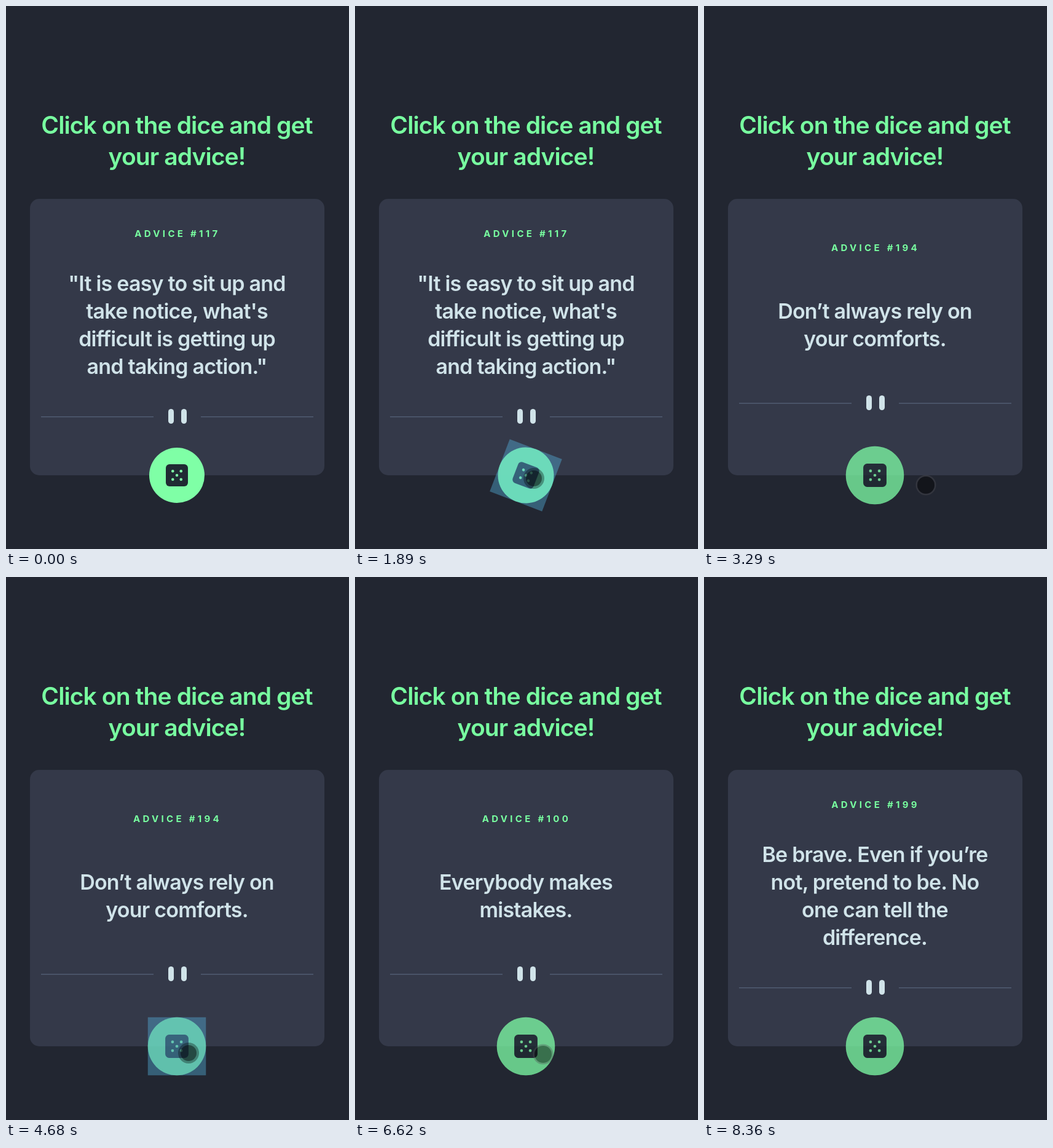
Write an HTML page with a canvas that moves like this. It is 558x884 px and loops after 9.21 s.

```html
<!DOCTYPE html>
<html lang="en">
<head>
<meta charset="utf-8">
<title>Advice dice</title>
<style>
  html, body { margin: 0; width: 100%; height: 100%; overflow: hidden; background: #222631; }
  canvas { position: absolute; left: 0; top: 0; }
  .text {
    position: absolute; left: -1px; width: 558px; margin: 0;
    text-align: center; white-space: pre;
    font-family: Inter, "Open Sans", sans-serif; font-weight: 600;
    font-optical-sizing: none; letter-spacing: -0.023em;
  }
  #title { top: 168px; font-size: 39px; line-height: 51px; color: #78ffa0; }
  #label { left: 0; font-size: 15px; line-height: 20px; font-weight: 700; letter-spacing: 4.3px; color: #78ffa0; }
  #quote { font-size: 34px; line-height: 45px; color: #d0e3e9; }
</style>
</head>
<body>
<canvas id="stage" width="558" height="884"></canvas>
<h1 id="title" class="text">Click on the dice and get
your advice!</h1>
<p id="label" class="text"></p>
<p id="quote" class="text"></p>
<script>
const W = 558, H = 884, LOOP = 9210;
const CX = 278, CY = 764, R = 45;
const BG = '#222631', CARD = '#343949', GREEN = '#7fffa6';
const PRESS = 140, HOLD = 130, TRIP = 500, EXIT_AT = 8100;

const ctx = document.getElementById('stage').getContext('2d');
const label = document.getElementById('label');
const quote = document.getElementById('quote');

const first = { id: 117, text: '"It is easy to sit up and\ntake notice, what\'s\ndifficult is getting up\nand taking action."' };

// Each round: the pointer arrives, taps, drifts away, and the reply shows up
const rounds = [
  { arrive: 950, tap: 1780, spot: [291, 769], away: [361, 780],
    reply: 3290, id: 194, text: 'Don’t always rely on\nyour comforts.' },
  { arrive: 4350, tap: 4680, spot: [297, 775], away: [357, 777],
    reply: 5150, id: 100, text: 'Everybody makes\nmistakes.' },
  { arrive: 6620, tap: 7080, spot: [306, 777], away: [395, 796],
    reply: 7700, id: 199, text: 'Be brave. Even if you’re\nnot, pretend to be. No\none can tell the\ndifference.' }
];

const trips = rounds.flatMap(r => [
  { at: r.arrive - TRIP, to: r.spot },
  { at: r.tap + HOLD, to: r.away }
]);
trips.push({ at: EXIT_AT, to: [590, 1000] });

const mix = (a, b, k) => a + (b - a) * k;
const clamp = k => Math.min(1, Math.max(0, k));
const tapped = (t, lead) => rounds.some(r => t >= r.tap - lead && t < r.tap + HOLD);

// cubic-bezier(.25, .1, .25, 1)
function ease(x) {
  const curve = (a, b, s) => 3 * a * s * (1 - s) ** 2 + 3 * b * s * s * (1 - s) + s ** 3;
  let lo = 0, hi = 1;
  for (let i = 0; i < 20; i++) {
    const mid = (lo + hi) / 2;
    if (curve(.25, .25, mid) < x) lo = mid; else hi = mid;
  }
  return curve(.1, 1, hi);
}

function disc(x, y, r, color) {
  ctx.fillStyle = color;
  ctx.beginPath();
  ctx.arc(x, y, r, 0, Math.PI * 2);
  ctx.fill();
}

function box(x, y, w, h, r, color) {
  ctx.fillStyle = color;
  ctx.beginPath();
  ctx.roundRect(x, y, w, h, r);
  ctx.fill();
}

function drawDivider(y) {
  for (const x of [57, 317]) box(x, y, 183, 1.5, 0, '#505c72');
  for (const x of [264, 285]) box(x, y - 12, 9, 24, 4.5, '#d0e3e9');
}

function drawDice() {
  box(-18, -18, 36, 36, 6, '#202a33');
  disc(0, 0, 2.25, GREEN);
  for (const x of [-6.75, 6.75])
    for (const y of [-6.75, 6.75]) disc(x, y, 2.25, GREEN);
}

function drawButton(t) {
  const hover = ease(clamp((t - rounds[0].tap - 25) / 500));
  const scale = 1 + .05 * hover;
  const place = draw => {
    ctx.save();
    ctx.translate(CX, CY);
    ctx.rotate(hover * Math.PI / 2);
    ctx.scale(scale, scale);
    draw();
    ctx.restore();
  };
  place(() => {
    disc(0, 0, R, GREEN);
    drawDice();
  });

  // Hover fades the button towards the card above and the page below
  ctx.save();
  ctx.globalAlpha = .25 * hover;
  [CARD, BG].forEach((color, half) => {
    ctx.fillStyle = color;
    ctx.beginPath();
    ctx.arc(CX, CY, R * scale, Math.PI * (1 - half), Math.PI * (2 - half));
    ctx.fill();
  });
  ctx.restore();

  if (tapped(t, 0)) place(() => box(-R, -R, 2 * R, 2 * R, 0, 'rgba(86,180,226,.4)'));
}

function drawPointer(t) {
  if (t < trips[0].at) return;
  let x = 401, y = 882;
  for (const { at, to } of trips) {
    const k = clamp((t - at) / TRIP);
    x = mix(x, to[0], k);
    y = mix(y, to[1], k);
  }
  if (tapped(t, PRESS)) {
    disc(x, y, 17, 'rgba(0,0,0,.33)');
    disc(x, y, 13, 'rgba(0,0,0,.43)');
    return;
  }
  ctx.strokeStyle = 'rgba(80,80,88,.36)';
  ctx.lineWidth = 2.5;
  ctx.beginPath();
  ctx.arc(x, y, 15.3, 0, Math.PI * 2);
  ctx.stroke();
  disc(x, y, 14, 'rgba(0,0,0,.44)');
}

let shown;
function showAdvice(item, short) {
  if (item === shown) return;
  shown = item;
  label.textContent = 'ADVICE #' + item.id;
  quote.textContent = item.text;
  label.style.top = (short ? 383.5 : 360.5) + 'px';
  quote.style.top = (short ? 473.5 : 428.5) + 'px';
}

function render(t) {
  const item = rounds.filter(r => r.reply <= t).pop() || first;
  const short = item.text.split('\n').length === 2;
  showAdvice(item, short);
  box(0, 0, W, H, 0, BG);
  box(39, 314, 479, 450, 15, CARD);
  drawDivider(short ? 646 : 668);
  drawButton(t);
  drawPointer(t);
}

const start = performance.now();
function tick() {
  render((performance.now() - start) % LOOP);
  requestAnimationFrame(tick);
}
tick();
</script>
</body>
</html>
```
